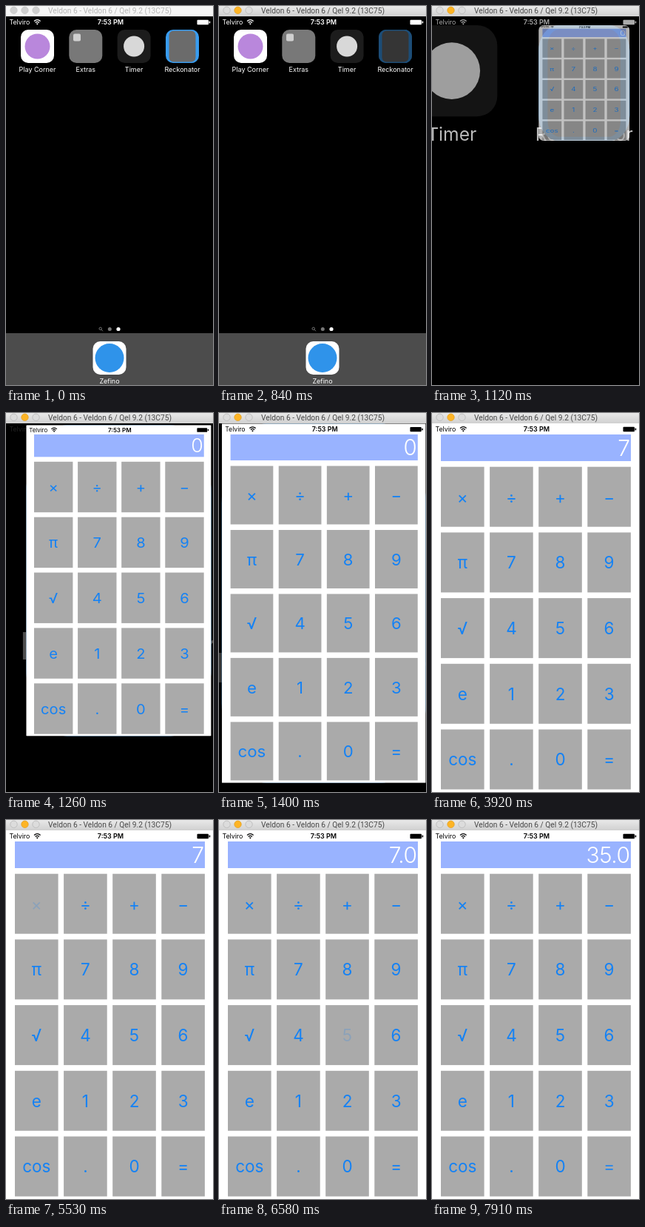
Recreate the animation shown at these times as an HTML page. Size 280 by 512 pixels, loop 8000 ms.

```html
<!DOCTYPE html>
<html lang="en">
<head>
<meta charset="utf-8">
<title>Launch and multiply</title>
<style>
  html, body { margin: 0; width: 100%; height: 100%; overflow: hidden; background: #000; }
  svg { display: block; width: 100vw; height: 100vh; font-family: Inter, Roboto, sans-serif; }
  .label { font-size: 9px; fill: #fff; text-anchor: middle; }
  .key { font-size: 22.5px; fill: #1482f5; text-anchor: middle; }
</style>
</head>
<body>
<svg id="stage" viewBox="0 0 280 512">
  <defs>
    <linearGradient id="bar" x2="0" y2="1">
      <stop stop-color="#e9e9e9"/><stop offset="1" stop-color="#d0d0d0"/>
    </linearGradient>
    <clipPath id="frame"><rect id="frameRect"/></clipPath>
    <g id="status">
      <text x="4.5" y="25" font-size="8.8">Telviro</text>
      <path d="M38 20.4Q42.3 16.8 46.6 20.4M39.7 22.4Q42.3 20.2 44.9 22.4" fill="none" stroke="currentColor" stroke-width="1.3"/>
      <path d="M40.8 23.8Q42.3 22.6 43.8 23.8L42.3 25.4Z"/>
      <text x="141.5" y="25.2" font-size="9" font-weight="600" text-anchor="middle">7:53 PM</text>
      <rect x="258.5" y="18.7" width="15.5" height="6.6" rx="1"/>
      <rect x="274.6" y="20.6" width="1.6" height="2.8" rx=".7"/>
    </g>
  </defs>
  <rect width="280" height="512"/>
  <g id="home"></g>
  <use id="homeStatus" href="#status" fill="#fff" color="#fff"/>
  <g id="icon">
    <rect x="216" y="32" width="45" height="45" rx="10" fill="#389cf0"/>
    <rect x="220.5" y="33.5" width="36" height="42" rx="6" fill="#6b6b6b"/>
    <rect id="shade" x="216" y="32" width="45" height="45" rx="10" opacity=".5"/>
  </g>
  <g id="app" clip-path="url(#frame)"><g id="screen">
    <rect y="14" width="280" height="498" fill="#fff"/>
    <use href="#status" fill="#000" color="#000"/>
    <rect x="12" y="29" width="257" height="36" fill="#99b3ff"/>
    <text id="display" x="267.5" y="58" font-size="30" font-weight="300" letter-spacing="-.5" fill="#fff" text-anchor="end"></text>
  </g></g>
  <rect id="titleBar" width="280" height="14"/>
  <g id="lights" stroke-width=".8"></g>
  <text id="title" x="140.5" y="9.8" font-size="10.2" font-family="Roboto, Inter, sans-serif" text-anchor="middle">Veldon 6 - Veldon 6 / Qel 9.2 (13C75)</text>
</svg>
<script>
const LOOP = 8000, STEP = 70;
const $ = id => document.getElementById(id);

function set(el, attrs) {
  for (const k in attrs) el.setAttribute(k, attrs[k]);
  return el;
}
function add(parent, tag, attrs, text = '') {
  const el = document.createElementNS('http://www.w3.org/2000/svg', tag);
  el.textContent = text;
  parent.appendChild(set(el, attrs));
  return el;
}

// Home screen
const home = $('home');
function tile(x, y, fill, name, dot) {
  if (fill) add(home, 'rect', { x, y, width: 45, height: 45, rx: 10, fill });
  if (dot) add(home, 'circle', { cx: x + 22.5, cy: y + 22.5, r: dot[0], fill: dot[1] });
  add(home, 'text', { x: x + 22.5, y: y + 57, class: 'label' }, name);
}
add(home, 'rect', { y: 442, width: 280, height: 70, fill: '#4c4c4c' });
tile(20, 32, '#fff', 'Play Corner', [17, '#b987dc']);
tile(85.3, 32, '#787878', 'Extras');
tile(150.6, 32, '#1c1c1c', 'Timer', [14, '#d8d8d8']);
tile(216, 32, null, 'Reckonator');
tile(117.5, 453, '#fff', 'Zefino', [19.5, '#2f93ea']);
add(home, 'rect', { x: 91, y: 37.5, width: 10, height: 10, rx: 2, fill: '#cfcfcf' });
add(home, 'circle', { cx: 127.7, cy: 435.8, r: 1.7, fill: 'none', stroke: '#777' });
add(home, 'path', { d: 'M129 437.2l2 2', stroke: '#777' });
add(home, 'circle', { cx: 140.3, cy: 436.5, r: 2.5, fill: '#777' });
add(home, 'circle', { cx: 152, cy: 436.5, r: 2.6, fill: '#fff' });

// Keypad
const keys = {};
'× ÷ + − π 7 8 9 √ 4 5 6 e 1 2 3 cos . 0 ='.split(' ').forEach((name, i) => {
  const x = 12 + (i % 4) * 66.1, y = 72.7 + Math.floor(i / 4) * 88.7;
  add($('screen'), 'rect', { x, y, width: 58.6, height: 81, fill: '#aaa' });
  keys[name] = add($('screen'), 'text', { x: x + 29.3, y: y + 48.9, class: 'key' }, name);
});

const lights = [10.5, 25.5, 40.5].map(cx => add($('lights'), 'circle', { cx, cy: 5.8, r: 4.7 }));

const presses = [
  { key: '7', down: 3290, up: 3500, shows: '7' },
  { key: '×', down: 5530, up: 5670, shows: '7.0' },
  { key: '5', down: 6580, up: 6720, shows: '5' },
  { key: '=', down: 7560, up: 7700, shows: '35.0' }
];

// Critically damped spring from 0 to 1
function spring(ms, rate) {
  const a = Math.max(0, ms) / 1000 * rate;
  return 1 - (1 + a) * Math.exp(-a);
}
const mix = (a, b, p) => a + (b - a) * p;

function keyAlpha(t, { down, up }) {
  if (t < down) return 1;
  if (t < up) return 0.2;
  const u = Math.min(1, (t - up + 35) / 350);
  return 1 - 0.8 * (1 - u) ** 1.5;
}

function drawTitle(active) {
  set($('titleBar'), { fill: active ? 'url(#bar)' : '#f6f6f6' });
  set($('title'), { fill: active ? '#484848' : '#b4b4b4' });
  lights.forEach((el, i) => {
    const lit = active && i === 1;
    set(el, {
      fill: lit ? '#fdb425' : active ? '#dcdcdc' : '#d0d0d0',
      stroke: lit ? '#e3a020' : active ? '#b8b8b8' : '#c8c8c8'
    });
  });
}

function drawZoom(t) {
  const done = t >= 1750;
  const p = done ? 1 : spring(t - 1051, 17.2);
  const v = done ? 1 : spring(t - 1061, 16.07);
  const x = mix(216, 0, p), y = mix(32, 14, p);
  const w = mix(45, 280, p), h = mix(45, 498, v);
  const s = w / 45, r = 10 * (1 - p);

  set(home, {
    transform: `translate(${x - 216 * s} ${y - 32 * s}) scale(${s})`,
    opacity: 1 - 0.8 * p
  });
  set($('homeStatus'), { opacity: 1 - p });
  set($('icon'), { transform: `translate(${x} ${y}) scale(${s} ${h / 45}) translate(-216 -32)` });
  set($('shade'), { visibility: t >= 840 ? 'visible' : 'hidden' });
  set($('frameRect'), { x, y, width: w, height: h, rx: r });
  set($('screen'), { transform: `translate(${x} ${y}) scale(${w / 280} ${h / 498}) translate(0 -14)` });
  set($('app'), { opacity: Math.min(1, 2.1 * p) });
}

function render(ms) {
  const t = Math.floor(ms % LOOP / STEP) * STEP;
  drawTitle(t >= 840);
  drawZoom(t);
  let shown = '0';
  for (const press of presses) {
    set(keys[press.key], { opacity: keyAlpha(t, press) });
    if (t >= press.up) shown = press.shows;
  }
  $('display').textContent = shown;
}

function tick() {
  render(performance.now());
  requestAnimationFrame(tick);
}
tick();
</script>
</body>
</html>
```
